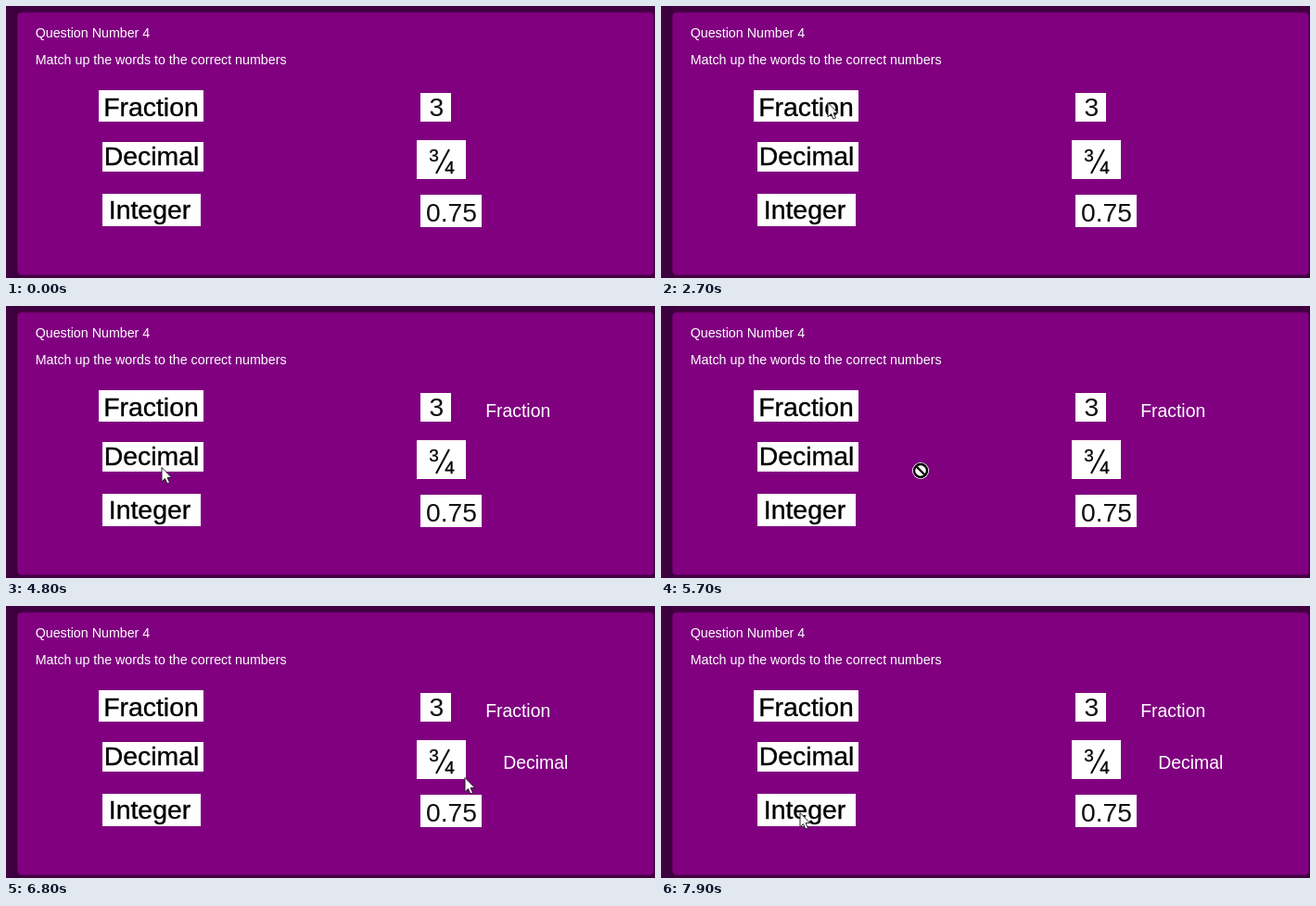
Animation, 700 px wide and 294 px high, one loop 8000 ms. Source, as an HTML page:

```html
<!DOCTYPE html>
<html lang="en">
<head>
<meta charset="utf-8">
<title>Match the words</title>
<style>
  html, body { margin: 0; width: 100%; height: 100%; overflow: hidden; background: #400040; }
  svg { display: block; width: 100vw; height: 100vh; }
  text { font-family: "Liberation Sans", Arial, sans-serif; white-space: pre; }
  .prompt { font-size: 14.25px; fill: #fff; }
  .card { font-size: 28.4px; stroke: #000; stroke-width: .35; }
  .value { font-size: 28.2px; fill: #111; }
  .part { font-size: 19px; stroke: #000; stroke-width: .3; }
  .answer { font-size: 19.4px; fill: #fff; }
</style>
</head>
<body>
<svg viewBox="0 0 700 294">
  <defs>
    <linearGradient id="edge">
      <stop offset="0" stop-color="#430043"/>
      <stop offset="1" stop-color="#380038"/>
    </linearGradient>
  </defs>
  <rect width="700" height="294" fill="#400040"/>
  <rect width="13" height="294" fill="url(#edge)"/>
  <rect x="12.5" y="7" width="686" height="283.5" rx="4" fill="#800080" stroke="#680068"/>

  <text class="prompt" x="31.7" y="34">Question Number 4</text>
  <text class="prompt" x="31.7" y="63">Match up the words to the correct numbers</text>

  <g fill="#fff">
    <rect x="100" y="91" width="113" height="34"/>
    <rect x="104" y="147" width="109" height="32"/>
    <rect x="104" y="203" width="106" height="35"/>
    <rect x="447" y="94" width="33" height="31"/>
    <rect x="443" y="145" width="53" height="42"/>
    <rect x="447" y="204" width="66" height="35"/>
  </g>
  <text class="card" x="105.2" y="119">Fraction</text>
  <text class="card" x="105.8" y="172">Decimal</text>
  <text class="card" x="110.8" y="230">Integer</text>

  <text class="value" x="456.4" y="119">3</text>
  <text class="part" x="456.2" y="168">3</text>
  <path d="M464 181L478 155" stroke="#000" stroke-width="2"/>
  <text class="part" x="473.3" y="181">4</text>
  <text class="value" x="453" y="233">0.75</text>

  <text class="answer" id="first" x="517.2" y="120">Fraction</text>
  <text class="answer" id="second" x="536.2" y="176">Decimal</text>

  <path id="arrow" d="M0 .5V15.8L3.5 12.6L5.9 18L8.5 16.9L6.1 11.6H10.8Z"
        fill="#fff" stroke="#222"/>
  <g id="blocked">
    <circle r="9" fill="#fff"/>
    <circle r="7" fill="none" stroke="#000" stroke-width="2.4"/>
    <path d="M-5-5L5 5" stroke="#000" stroke-width="2.4"/>
  </g>
</svg>
<script>
  const LOOP = 8000, STEP = 100, GRAB = 200;
  const [first, second, arrow, blocked] =
    ["first", "second", "arrow", "blocked"].map(id => document.getElementById(id));

  const point = (x, y) => ({ x, y });
  const entry = point(492, 282), rest = point(342, 193);
  const fraction = point(180, 104), decimal = point(168, 174), integer = point(150, 223);
  const firstDrop = point(480, 107), secondDrop = point(505, 186);

  const linear = u => u;
  const smooth = u => u * u * (3 - 2 * u);
  const move = (from, to, start, end, bow = 0) => ({ from, to, start, end, bow, ease: smooth });
  const drag = (from, to, start, end, answer) =>
    ({ from, to, start, end, bow: 0, ease: linear, answer });

  const moves = [
    move(entry, rest, 1400, 1700),
    move(rest, fraction, 1900, 2700),
    drag(fraction, firstDrop, 2800, 3700, first),
    move(firstDrop, decimal, 3800, 4800),
    drag(decimal, secondDrop, 5200, 6700, second),
    move(secondDrop, integer, 6700, 7700, 21)
  ];

  function positionAt({ from, to, start, end, bow, ease }, t) {
    const u = ease(Math.min(1, (t - start) / (end - start)));
    return [
      from.x + (to.x - from.x) * u,
      from.y + (to.y - from.y) * u - bow * 4 * u * (1 - u)
    ].map(Math.round);
  }

  const show = (node, on) => node.setAttribute("visibility", on ? "visible" : "hidden");

  function render(time) {
    const t = Math.floor((time % LOOP) / STEP) * STEP;
    const current = moves.filter(m => m.start <= t).pop();
    const dragging = Boolean(current?.answer) && t >= current.start + GRAB && t < current.end;
    if (current) {
      const place = `translate(${positionAt(current, t)})`;
      arrow.setAttribute("transform", place);
      blocked.setAttribute("transform", place);
    }
    show(arrow, current && !dragging);
    show(blocked, dragging);
    moves.filter(m => m.answer).forEach(m => show(m.answer, t >= m.end));
  }

  const start = performance.now();
  function tick(now) {
    render(Math.max(0, now - start));
    requestAnimationFrame(tick);
  }
  render(0);
  requestAnimationFrame(tick);
</script>
</body>
</html>
```
